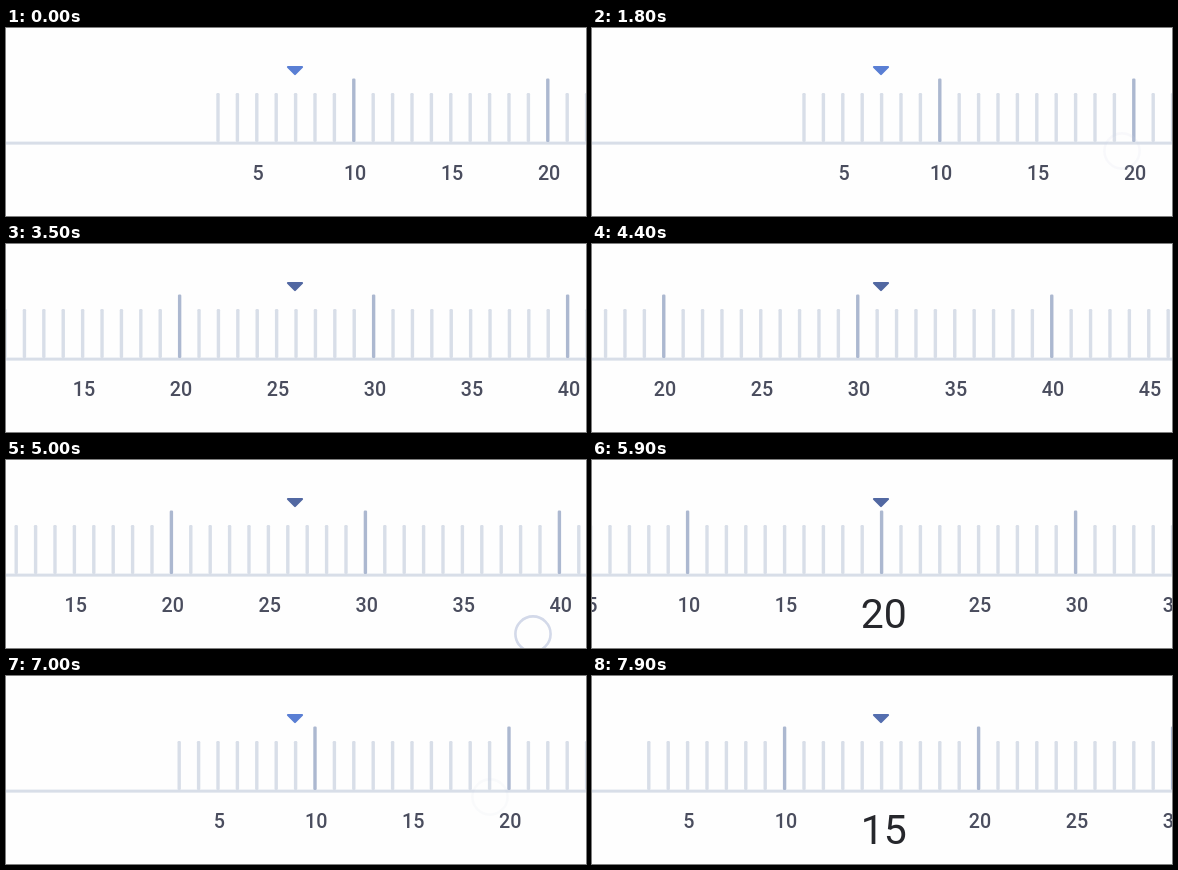
An HTML page for the animation above (8000 ms loop, 580 by 188 pixels).

```html
<!DOCTYPE html>
<html lang="en">
<head>
<meta charset="utf-8">
<title>Ruler picker</title>
<style>
  html, body { margin: 0; width: 100%; height: 100%; overflow: hidden; background: #fefefe; }
  svg { display: block; width: 580px; height: 188px; }
  text { font-family: Roboto, "Open Sans", sans-serif; text-anchor: middle; }
</style>
</head>
<body>
<svg viewBox="0 0 580 188">
  <rect y="113.6" width="580" height="3" fill="#d8dee8"/>
  <g id="ruler"></g>
  <path id="pointer" d="M282 39H296L289 46Z" stroke-width="2.2" stroke-linejoin="round"/>
  <circle id="touch" r="17.6" fill="#fff" fill-opacity=".6" stroke="#d3d9e9" stroke-width="2.6"/>
</svg>
<script>
const LOOP = 8000, STEP = 100;
const CENTER = 289.6, GAP = 19.4, FIRST = 3, LAST = 60;
const LABEL_TOP = 138.4, CAP = 0.711, SMALL = 19.7, BIG = 41;

const ruler = document.getElementById('ruler');
const pointer = document.getElementById('pointer');
const touch = document.getElementById('touch');

const mix = (a, b, k) => a + (b - a) * k;
const clamp = x => Math.max(0, Math.min(1, x));
const smooth = x => x * x * (3 - 2 * x);
const easeInOut = u => u < .5 ? 4 * u ** 3 : 1 - 4 * (1 - u) ** 3;
const progress = (t, { start, end }) => clamp((t - start) / (end - start));
const rgb = (from, to, k) => `rgb(${from.map((c, i) => Math.round(mix(c, to[i], k)))})`;

// The ruler glides from one value to the next.
const REST = 7;
const glides = [
  { start: 1900, end: 2865, to: 17.4 },
  { start: 2865, end: 3560, to: 26 },
  { start: 3700, end: 4500, to: 31.27 },
  { start: 4500, end: 5550, to: 20 },
  { start: 5900, end: 6400, to: 15 },
  { start: 6400, end: 7000, to: 9 },
  { start: 7150, end: 7700, to: 15 }
];

// The finger sweeps sideways while it drops along a parabola.
const drags = [
  { start: 1900, end: 2900, from: [530, 123], to: [367, 161] },
  { start: 3800, end: 4200, from: [500, 121], to: [385, 157] },
  { start: 4600, end: 5000, from: [375, 145], to: [527, 174] },
  { start: 7110, end: 7600, from: [484, 121], to: [368, 152] }
];

const valueAt = t => glides.reduce((v, g) => mix(v, g.to, easeInOut(progress(t, g))), REST);
const fade = (t, d) => Math.min(clamp((t - d.start + 140) / 300), clamp((d.end + 200 - t) / 200));

function set(el, attrs) {
  for (const name in attrs) el.setAttribute(name, attrs[name]);
}

function add(tag, attrs) {
  const el = document.createElementNS('http://www.w3.org/2000/svg', tag);
  set(el, attrs);
  return ruler.appendChild(el);
}

const marks = [];
for (let n = FIRST; n <= LAST; n++) {
  const major = n % 10 === 0, top = major ? 50.5 : 65;
  const tick = add('rect', {
    y: top, width: 3.4, height: 114 - top, rx: 1.2,
    fill: major ? '#acb8d0' : '#d8dee8'
  });
  const label = n % 5 === 0 ? add('text', {}) : null;
  if (label) label.textContent = n;
  marks.push({ n, tick, label });
}

function drawMark({ n, tick, label }, value) {
  const x = CENTER + (n - value) * GAP;
  tick.setAttribute('x', x - 1.7);
  if (!label) return;
  const grow = smooth(clamp(1 - Math.abs(n - value) / 0.9));
  const size = mix(SMALL, BIG, grow);
  set(label, {
    x: x + mix(1.3, 2.2, grow), y: LABEL_TOP + size * CAP,
    'font-size': size, 'font-weight': grow > .3 ? 400 : 500,
    fill: rgb([74, 77, 94], [38, 39, 44], grow)
  });
}

function draw(t) {
  const value = valueAt(t);
  marks.forEach(mark => drawMark(mark, value));

  // The pointer is brighter at low values.
  const color = rgb([90, 127, 212], [82, 104, 162], clamp((value - 9) / 8));
  set(pointer, { fill: color, stroke: color });

  const drag = drags.find(d => fade(t, d) > 0);
  set(touch, { opacity: drag ? fade(t, drag) : 0 });
  if (!drag) return;
  const u = progress(t, drag);
  set(touch, {
    cx: mix(drag.from[0], drag.to[0], u),
    cy: mix(drag.from[1], drag.to[1], u * u)
  });
}

const began = performance.now();
function frame() {
  const t = (performance.now() - began) % LOOP;
  draw(Math.floor(t / STEP) * STEP);
  requestAnimationFrame(frame);
}
frame();
</script>
</body>
</html>
```
